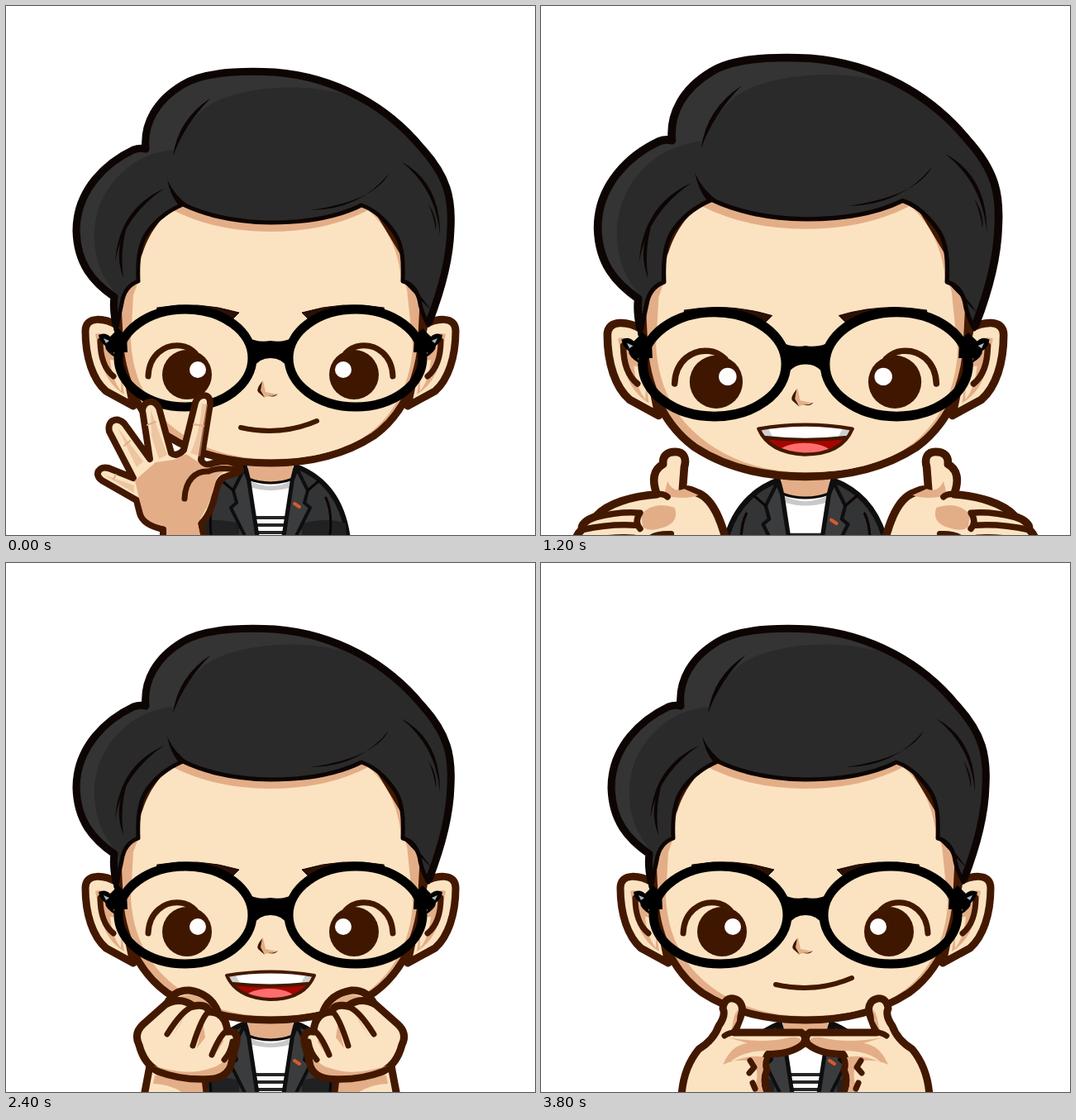
Recreate the animation shown at these times as an HTML page. Size 640x640 px, loop 3.9 s.

```html
<!DOCTYPE html>
<html lang="en">
<head>
<meta charset="utf-8">
<title>Greeting</title>
<style>
html, body { margin: 0; width: 100%; height: 100%; overflow: hidden; background: #fff; }
svg { display: block; width: 100vw; height: 100vh; }
path { stroke-linecap: round; stroke-linejoin: round; }
.line { fill: none; stroke: #431800; stroke-width: 7; }
.skin { fill: #fbe3c1; stroke: #431800; stroke-width: 9; }
.tan { fill: #e3ae87; }
.light { fill: #fbe3c1; }
.brown { fill: #3f1600; }
.ink { fill: none; stroke: #0d0503; }
.strand { fill: #0d0503; }
.hand .skin { stroke-width: 8; }
.hand, .mouth { visibility: hidden; }
.on { visibility: visible; }
</style>
</head>
<body>
<svg viewBox="0 0 640 640">
<defs>
  <clipPath id="smileClip"><path d="M267 499Q320 490 373 499Q361 528 319 528Q279 526 267 499Z"/></clipPath>
  <clipPath id="ohClip"><path id="ohShape" d="M291 508C291 491 304 483 320 483C336 483 349 491 349 508Q350 526 320 526Q290 526 291 508Z"/></clipPath>

  <g id="coat">
    <path d="M289 557C255 570 232 597 226 645H304L293 573Z" fill="#333435" stroke="#0e0e0f" stroke-width="6"/>
    <path d="M229 626Q250 618 282 626V645H228Z" fill="#202122"/>
    <path d="M288 560L275 586L279 601L272 607L291 645H304L293 573Z" fill="#3b3c3d" stroke="#0e0e0f" stroke-width="4"/>
    <path d="M253 595Q245 612 248 640M275 586L262 575" class="ink" stroke-width="3"/>
  </g>

  <g id="ear">
    <path class="skin" d="M134 386C120 378 96 374 96 393C96 425 105 452 121 466L154 484Z"/>
    <path class="tan" d="M108 397Q120 392 134 410L143 470Q121 457 114 426Z"/>
    <path class="light" d="M126 428Q128 452 139 466L140 430Z"/>
    <path class="line" d="M114 405C114 426 120 440 130 448" stroke-width="6"/>
  </g>

  <g id="eye">
    <path d="M183 365Q232 356 282 371L275 378Q236 366 183 374Z" fill="#2d0f03" stroke="#150803" stroke-width="1"/>
    <circle class="brown" cx="219" cy="446" r="30"/>
    <path class="line" d="M172 448C173 422 192 409 211 411Q221 412 229 420" stroke-width="8"/>
    <circle cx="232" cy="440" r="10" fill="#fff"/>
  </g>

  <g id="lens">
    <ellipse cx="217" cy="426" rx="81" ry="59" fill="none" stroke="#000" stroke-width="11"/>
    <path d="M112 398Q120 394 126 400L136 390L146 400L147 419H130L132 425Q120 418 120 411Q113 406 112 398Z"/>
    <path d="M118 402L125 405L121 408Z" fill="#a9b5bb"/>
    <path d="M291 400Q304 408 320 405V426Q306 426 299 438Z"/>
  </g>

  <g id="open">
    <path class="skin" d="M235 645C228 612 218 578 197 571Q187 566 181 568L183 542C186 532 182 525 173 525C163 525 158 530 159 539C148 545 146 557 152 573C125 575 96 583 83 598Q66 604 67 613Q57 623 62 630L67 645Z"/>
    <path class="tan" d="M134 596Q148 580 172 588Q178 605 158 611Q144 616 136 610Z"/>
    <path class="tan" d="M164 558Q170 572 183 567L199 574Q183 580 160 574ZM118 645Q140 632 160 645Z"/>
    <path class="line" d="M152 573Q160 572 164 576M83 599Q110 592 133 594Q126 604 133 612M68 613Q100 606 128 608M62 628Q100 620 126 622M92 645Q92 628 116 631Q128 633 133 640M138 630Q144 617 168 618" stroke-width="6"/>
  </g>

  <g id="fist">
    <path class="skin" d="M174 608L167 645H242L236 620Z"/>
    <path class="tan" d="M180 620H236L239 645H220Q200 630 178 630Z"/>
    <path class="skin" d="M194 534Q203 516 222 517Q247 521 256 542L230 560Z"/>
    <path class="tan" d="M201 529Q219 518 234 525Q246 531 250 541L226 537Z"/>
    <path class="skin" d="M193 534L166 558Q154 569 161 583Q167 606 184 615Q214 626 246 624Q268 622 272 607L279 580Q281 565 268 567Q266 543 246 543Q243 533 227 536Q211 524 193 534Z"/>
    <path class="tan" d="M178 608Q220 621 245 612Q263 608 269 594L268 606Q264 619 246 620Q212 622 185 611ZM217 546L201 573L212 556ZM238 555L231 587L241 574ZM260 568L252 596L263 579Z"/>
    <path class="line" d="M226 537Q214 540 195 570M245 543Q237 549 226 584M267 566Q259 571 249 595"/>
    <path class="line" d="M274 579Q272 592 264 601" stroke-width="5"/>
  </g>

  <g id="point">
    <path class="skin" d="M170 645Q172 611 191 588Q209 577 215 560Q224 547 220 539C221 530 226 526 233 527C243 529 246 539 241 550L234 568H315Q323 574 317 582Q302 594 275 594Q269 602 273 613Q267 628 276 645Z"/>
    <path class="tan" d="M226 574Q269 582 301 574Q316 573 314 579Q301 590 274 590Q243 590 229 604Q252 594 270 598Q267 606 269 613Q263 628 271 645H255Q266 621 258 603Q235 599 220 607Q230 583 250 581Z"/>
    <path class="tan" d="M238 540Q232 548 231 565L237 554Z"/>
    <path class="line" d="M222 572Q229 567 240 568H315" stroke-width="8"/>
    <path class="line" d="M253 602L258 610L252 617M256 629L259 636" stroke-width="5"/>
  </g>
</defs>

<g id="stage">
  <!-- body -->
  <path d="M288 565H352L342 645H299Z" fill="#fff"/>
  <path d="M294 574Q320 588 346 574V582Q320 590 295 582Z" fill="#c9c9c9"/>
  <path class="tan" d="M293 550H347V572Q320 582 293 572Z"/>
  <path class="ink" d="M293 572Q320 582 347 572" stroke-width="3"/>
  <path d="M300 619H340M301 628H339M302 637H338" stroke="#252527" stroke-width="4"/>
  <use href="#coat"/><use href="#coat" class="flip"/>
  <path d="M349 602L355 606" stroke="#d8592b" stroke-width="4"/>

  <!-- head -->
  <use href="#ear"/><use href="#ear" class="flip"/>
  <path d="M134 340L137 400C139 450 160 495 195 520C235 546 280 553 320 553C360 553 405 546 445 520C480 495 501 450 503 400L506 340L440 230H205Z" fill="#e3ae87" stroke="#431800" stroke-width="9"/>
  <path class="light" d="M160 333C160 296 178 265 200 246Q252 273 320 273Q388 273 438 247C462 267 475 297 478 330Q486 338 486 352L492 410C490 470 456 510 425 526C390 544 355 548 320 548C285 548 250 541 218 521C180 497 154 460 151 405L154 350Z"/>

  <!-- hair -->
  <path d="M133 392Q129 365 131 352C105 334 86 312 85 272C85 222 122 189 154 174Q162 171 169 173C166 142 182 114 214 95C240 79 285 78 325 80C400 86 462 122 503 172C535 207 540 234 538 270C537 307 526 346 511 386Q502 370 500 355Q495 337 480 333C481 310 480 290 471 276Q453 249 430 241Q388 262 320 262Q258 261 214 240Q186 252 171 274Q158 292 160 333Q143 339 140 360Z" fill="#2a2a2a" stroke="#0d0503" stroke-width="5" stroke-linejoin="miter"/>
  <path fill="#343434" d="M134 349C106 332 90 308 90 270C91 224 126 190 160 176H171C168 146 186 118 214 99C245 82 290 82 330 85Q375 90 405 106C350 90 268 101 240 124Q213 148 203 174Q171 177 148 195C108 226 99 274 113 315Q120 334 134 349Z"/>
  <path class="ink" stroke-width="9" d="M133 385Q129 365 131 352C105 334 86 312 85 272C85 222 122 189 154 174Q162 171 169 173C166 142 182 114 214 95C240 79 285 78 325 80C400 86 462 122 503 172C535 207 540 234 538 270C537 307 526 346 512 382"/>
  <path class="strand" d="M248 111Q208 137 202 182Q216 143 248 111ZM191 221Q136 246 132 310Q141 255 191 221ZM148 261Q129 295 142 329Q137 294 148 261ZM195 210Q204 230 222 242L208 240Q199 229 195 210ZM463 203Q445 236 368 247Q427 247 463 203ZM478 188Q526 214 525 277Q520 221 478 188ZM511 239Q522 256 520 272Q518 255 511 239ZM480 333Q500 346 514 368Q499 353 480 333Z"/>

  <!-- face -->
  <use href="#eye"/><use href="#eye" class="flip"/>
  <path class="tan" d="M311 453L305 466L313 473L329 470L314 467Z"/>
  <path class="brown" d="M310 454Q302 464 305 467L313 474L308 465ZM317 471Q323 473 329 469Q324 475 317 471Z"/>
  <use href="#lens"/><use href="#lens" class="flip"/>

  <path id="calm" class="mouth line" d="M284 510Q332 521 376 502" style="stroke-width:6"/>
  <g id="smile" class="mouth">
    <g clip-path="url(#smileClip)">
      <path d="M260 485H380V535H260Z" fill="#a60500"/>
      <path d="M260 485H380V507Q320 514 260 507Z" fill="#fff"/>
      <path d="M260 495L277 497L284 510L262 510ZM380 495L363 497L356 510L378 510Z" fill="#cfcfcf"/>
      <ellipse cx="319" cy="528" rx="31" ry="13" fill="#ff6e6b"/>
    </g>
    <path class="line" d="M267 499Q320 490 373 499Q361 528 319 528Q279 526 267 499ZM275 509Q320 514 365 509" style="stroke-width:4"/>
  </g>
  <g id="oh" class="mouth">
    <g clip-path="url(#ohClip)">
      <path d="M285 480H355V530H285Z" fill="#8c0b05"/>
      <path d="M285 480H355V494Q320 497 285 494Z" fill="#fff"/>
      <path d="M285 500Q320 497 355 500V530H285Z" fill="#ff6868"/>
    </g>
    <path class="line" d="M299 494Q320 497 341 494" style="stroke-width:3"/>
    <use href="#ohShape" class="line" style="stroke-width:4"/>
  </g>

  <!-- hands -->
  <g id="wave" class="hand">
    <path class="skin" d="M190 645V633Q166 628 162 614L158 598L116 574C106 567 112 556 124 559L154 571L125 515C122 502 133 496 143 505L174 548L165 489C167 477 179 475 185 486L200 541Q207 546 215 537L229 480C233 468 248 468 247 481L236 549Q239 558 251 553Q270 548 282 557C290 565 272 566 262 571C254 577 254 592 249 605Q244 619 236 626L240 645Z"/>
    <path class="tan" d="M156 574L181 552L203 549L218 542L233 552Q240 562 255 557Q270 552 279 560Q261 562 255 571Q251 588 244 605Q237 617 232 626L236 645H194V630Q169 625 166 614L161 596Z"/>
    <path class="tan" d="M237 481Q235 515 223 541L235 545L244 482ZM175 488L195 543L185 548L176 520ZM135 510L166 551L158 558ZM118 567L155 580V589Z" opacity=".55"/>
    <path class="line" d="M216 596C217 574 229 562 245 563Q259 557 278 561"/>
    <path d="M171 507L181 503M143 532L150 526M227 506L239 508M130 572L133 567" fill="none" stroke="#e3ae87" stroke-width="2"/>
  </g>
  <g id="welcome" class="hand"><use href="#open"/><use href="#open" class="flip"/></g>
  <g id="fists" class="hand"><use href="#fist"/><use href="#fist" class="flip"/></g>
  <g id="touch" class="hand"><use href="#point"/><use href="#point" class="flip"/></g>
</g>
</svg>
<script>
const STEP = 100;
// Each act: hands, zoom when enlarged, and its rhythm (1 = enlarged)
const acts = [
  ['wave', 1.05, '0101010101'],
  ['welcome', 1.07, '0010101010'],
  ['fists', 1.05, '010101010'],
  ['touch', 1.05, '0101010100']
];
const beats = acts.flatMap(([hand, zoom, rhythm]) =>
  [...rhythm].map(b => ({ hand, big: b === '1', scale: b === '1' ? zoom : 1, mouth: 'smile' })));
beats.forEach(b => { if (b.hand === 'wave') b.mouth = b.big ? 'oh' : 'calm'; });
beats[beats.length - 1].mouth = 'calm';

const stage = document.getElementById('stage');
const parts = document.querySelectorAll('.hand, .mouth');
document.querySelectorAll('.flip').forEach(el =>
  el.setAttribute('transform', 'matrix(-1 0 0 1 640 0)'));

const start = performance.now();
function draw() {
  const i = Math.floor((performance.now() - start) / STEP) % beats.length;
  const { hand, mouth, scale } = beats[i];
  stage.setAttribute('transform', `translate(320 320) scale(${scale}) translate(-320 -320)`);
  parts.forEach(p => p.classList.toggle('on', p.id === hand || p.id === mouth));
  requestAnimationFrame(draw);
}
draw();
</script>
</body>
</html>
```
